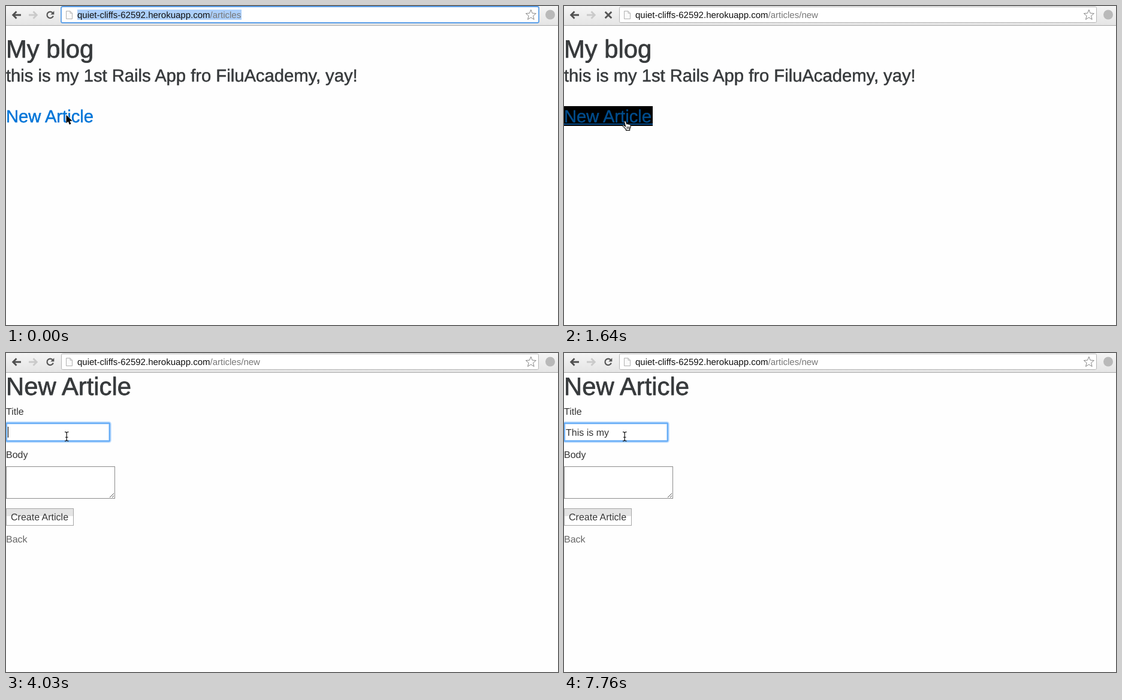
Recreate the animation shown at these times as an HTML page. Size 921 by 532 pixels, loop 8000 ms.

```html
<!DOCTYPE html>
<html lang="en">
<head>
<meta charset="utf-8">
<title>New Article</title>
<style>
html, body { margin: 0; width: 100%; height: 100%; overflow: hidden; background: #fefefe; }
svg { display: block; font: 16px "Liberation Sans", Arial, sans-serif; }
text { white-space: pre; text-rendering: geometricPrecision; fill: #333; }
.h1, .h2 { fill: #373a3c; stroke: #373a3c; stroke-width: .75; stroke-linejoin: round; }
.h1 { font-size: 41.8px; }
.h2 { font-size: 29.2px; stroke-width: .55; }
.url { font-size: 15px; }
.line { fill: none; stroke: #555; }
</style>
</head>
<body>
<svg width="921" height="532" viewBox="0 0 921 532">
  <defs>
    <linearGradient id="bar" x2="0" y2="1">
      <stop stop-color="#f5f5f5"/><stop offset="1" stop-color="#e5e5e5"/>
    </linearGradient>
    <path id="back" d="M11.5 15H25M17.5 9.2 11.7 15l5.8 5.8" fill="none" stroke-width="2.8"/>
  </defs>

  <!-- toolbar -->
  <rect width="921" height="32" fill="url(#bar)"/>
  <rect y="32" width="921" height="1" fill="#a9a9a9"/>
  <use href="#back" stroke="#505050"/>
  <use href="#back" stroke="#cacaca" transform="matrix(-1 0 0 1 63 0)"/>
  <g id="reload">
    <path class="line" stroke-width="2.2" d="M77.6 11.2A5.3 5.3 0 1 0 78.8 16.6"/>
    <path fill="#555" d="M80.3 8.3V14.3H74.3Z"/>
  </g>
  <path id="stop" class="line" stroke-width="2.9" d="M68.7 9.7 79.3 20.3M79.3 9.7 68.7 20.3"/>
  <rect id="box" x="92.5" y="1.5" width="796" height="26" rx="2" fill="#fff" stroke="#b5b5b5"/>
  <rect id="boxFocus" x="92" y="1" width="797" height="27" rx="2.5" fill="#fff" stroke="#5b9fe8" stroke-width="1.8"/>
  <path d="M100.5 8.5H107L110.5 12V21.5H100.5ZM107 8.5V12H110.5" fill="#fafafa" stroke="#b0b0b0"/>
  <rect id="selection" x="119" y="6" width="274" height="17" fill="#accffa"/>
  <text class="url" x="119" y="20"><tspan fill="#111">quiet-cliffs-62592.herokuapp.com</tspan><tspan id="path" fill="#777"></tspan></text>
  <path id="star" fill="#fff" stroke="#858585"/>
  <circle cx="908" cy="14.5" r="8" fill="#b9b9b9"/>

  <!-- article list -->
  <g id="list">
    <text class="h1" y="86">My blog</text>
    <text class="h2" y="126">this is my 1st Rails App fro FiluAcademy, yay!</text>
    <rect id="hover" y="167" width="148" height="33"/>
    <text id="link" class="h2" y="194">New Article</text>
    <rect id="underline" y="196" width="148" height="2" fill="#014c8c"/>
  </g>

  <!-- article form -->
  <g id="form">
    <text class="h1" y="70">New Article</text>
    <text y="103">Title</text>
    <rect x=".5" y="117.5" width="172" height="29" fill="#fff" stroke="#d0d0d0"/>
    <g id="focus" fill="none" stroke="#5aa7f8">
      <rect x="0" y="116.5" width="173.5" height="31" rx="2" stroke-width="5" opacity=".3"/>
      <rect x=".5" y="117" width="172.5" height="30" rx="1" stroke-width="2.4" opacity=".85"/>
    </g>
    <text id="title" x="3" y="138"></text>
    <rect id="caret" y="123" width="1" height="18"/>
    <text y="175">Body</text>
    <rect x=".5" y="189.5" width="181" height="53" fill="#fff" stroke="#8c8c8c"/>
    <path class="line" d="M173 241 180 234M177 241 180 238"/>
    <rect x=".5" y="259.5" width="112" height="28" fill="#fff" stroke="#a6a6a6"/>
    <rect x="1" y="260" width="111" height="12" fill="#e4e4e4"/>
    <text x="8" y="279">Create Article</text>
    <text y="316" style="fill:#666">Back</text>
  </g>

  <!-- pointers -->
  <path id="arrow" d="M0 0V14L3.2 11 5.4 16.2 8 15 5.8 10.2H10.2Z" stroke="#fff" stroke-width="1.1" paint-order="stroke"/>
  <g id="hand" transform="translate(97 190)" stroke="#111" stroke-width="1.2" stroke-linejoin="round">
    <path fill="#fff" d="M5.6 11 3.7 3.7C3.2 1.3 5.8.9 6.4 3L7.7 7C8.3 5.7 10 6 10.2 7.4 11 6.3 12.3 6.8 12.5 8 13.6 7.4 14.4 8.4 14.2 9.8 14.1 12 13.8 13.6 12.6 15V17.4H6.5V15.8C4.8 13.8 3 12 1.1 10.4 0 9 1.6 8 3 8.9Z"/>
    <path d="M8.1 11V15M10 11V15M11.9 11V15" stroke-width=".9"/>
  </g>
  <path id="beam" class="line" style="stroke:#111" stroke-width="1.2" d="M98 131.7Q101 131.7 101.2 133.5 101.4 131.7 104.5 131.7M101.2 133V145.5M98 146.8Q101 146.8 101.2 145 101.4 146.8 104.5 146.8M99 140.5H103.5"/>
</svg>
<script>
const LOOP = 8000;
const $ = id => document.getElementById(id);
const show = (id, on) => { $(id).style.display = on ? "" : "none"; };

// time, title text, caret visible
const typing = [
  [0, "", false], [4030, "", true], [4480, "", false], [4630, "Th", true],
  [4930, "Ths", true], [5380, "Th", true], [5530, "This", true],
  [5820, "This ", true], [5970, "This i", true], [6120, "This is", true],
  [6270, "This is ", true], [6720, "This is ", false], [6870, "This is m", true],
  [7020, "This is my", true], [7170, "This is my ", true], [7760, "This is my ", false]
];

$("star").setAttribute("d", "M" + Array.from({ length: 10 }, (_, i) => {
  const a = i * Math.PI / 5, r = i % 2 ? 3.9 : 9;
  return `${(875.8 + r * Math.sin(a)).toFixed(2)} ${(15.2 - r * Math.cos(a)).toFixed(2)}`;
}).join("L") + "Z");

function draw(t) {
  const within = (from, to) => t >= from && t < to;

  const loading = within(1040, 2690) || within(2980, 3130);
  show("reload", !loading);
  show("stop", loading);
  show("box", t >= 1040);
  show("boxFocus", t < 1040);
  show("selection", t < 1040);
  $("path").textContent = t < 1640 ? "/articles" : "/articles/new";

  const hovered = t >= 300;
  show("list", t < 2690);
  show("hover", hovered);
  show("underline", hovered);
  $("link").style.fill = $("link").style.stroke = hovered ? "#014c8c" : "#0275d8";

  show("form", t >= 2690);
  show("focus", t >= 4030);
  const [, text, caret] = typing.findLast(step => step[0] <= t);
  const title = $("title");
  title.textContent = text;
  show("caret", caret);
  if (caret) $("caret").setAttribute("x", Math.floor(3.1 + title.getComputedTextLength()));

  const [x, y] = t < 300 ? [100.5, 181.5] : t < 450 ? [100.5, 188.5] : [103, 167];
  $("arrow").setAttribute("transform", `translate(${x} ${y})`);
  show("arrow", t < 450 || within(3430, 3580));
  show("hand", within(450, 3430));
  show("beam", t >= 3580);
}

const start = performance.now();
function tick() {
  draw((performance.now() - start) % LOOP);
  requestAnimationFrame(tick);
}
tick();
</script>
</body>
</html>
```
